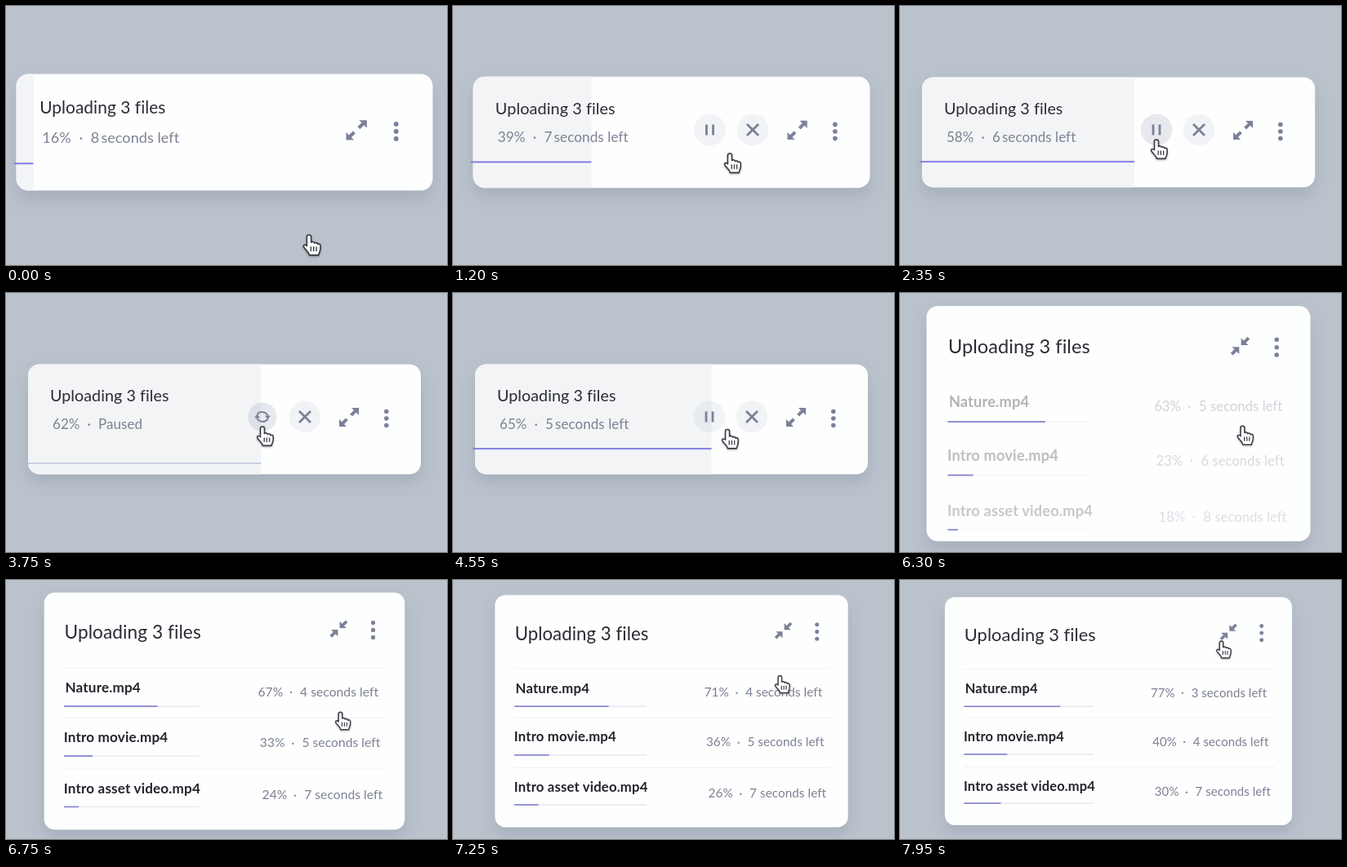
These frames come from a looping animation (540 px wide and 318 px high, 8000 ms). An HTML page:

```html
<!DOCTYPE html>
<html lang="en">
<head>
<meta charset="utf-8">
<title>Upload card</title>
<style>
html, body { margin: 0; width: 100%; height: 100%; overflow: hidden; background: #bac2cc; }
svg { display: block; width: 100%; height: 100%; }
text { font-family: Lato, "Open Sans", sans-serif; fill: #7e8094; font-size: 17px; letter-spacing: .06px; white-space: pre; }
#title { fill: #2c2c36; }
.name { fill: #24242e; font-size: 18.6px; font-weight: 700; letter-spacing: .2px; }
</style>
</head>
<body>
<svg viewBox="0 0 540 318">
  <defs>
    <filter id="shade" x="-15%" y="-15%" width="130%" height="150%">
      <feDropShadow dx="0" dy="10" stdDeviation="9" flood-color="#5f6b80" flood-opacity=".22"/>
    </filter>
    <filter id="handShade" x="-40%" y="-40%" width="180%" height="180%">
      <feDropShadow dx="0" dy="1.2" stdDeviation="1.2" flood-color="#30323e" flood-opacity=".35"/>
    </filter>
    <clipPath id="clip"><rect id="clipBox" x="-240.5" width="481" rx="14"/></clipPath>
    <path id="arrow" d="M3-11.5H12V-2.5L8.8-5.7 4-1 1.2-3.8 6-8.5Z"/>
    <g id="turn">
      <path d="M-6.6-2.2A7 6.3 0 0 1 6.6-1" fill="none" stroke="#7e8098" stroke-width="2"/>
      <path d="M3-1.2H10L6.6 3Z" fill="#7e8098"/>
    </g>
  </defs>
  <rect width="540" height="318" fill="#bac2cc"/>
  <g id="cam">
    <rect id="card" x="-240.5" width="481" rx="14" fill="#fdfefe" filter="url(#shade)"/>
    <g id="compact">
      <rect id="fill" x="-240.5" y="-160" height="320" fill="#f2f4f6" clip-path="url(#clip)"/>
      <rect id="line" height="1.8"/>
      <text id="pct" x="-210.5" y="12"></text>
      <text x="-168" y="12">·</text>
      <text id="num" x="-154.5" y="12"></text>
      <text id="left" y="12"></text>
    </g>
    <g id="buttons">
      <g transform="translate(46.5 -3)">
        <circle id="disc" fill="#3c4678"/>
        <path id="pause" d="M-4-6.5V6.5M4-6.5V6.5" stroke="#7e8098" stroke-width="2.8"/>
        <g id="retry"><use href="#turn"/><use href="#turn" transform="rotate(180)"/></g>
      </g>
      <g transform="translate(98.5 -3)">
        <circle r="19.3" fill="#3c4678" fill-opacity=".06"/>
        <path d="M-7-7L7 7M7-7L-7 7" stroke="#7e8098" stroke-width="2.8"/>
      </g>
    </g>
    <g id="rows"></g>
    <text id="title" x="-213.5">Uploading 3 files</text>
    <g id="expand">
      <use class="tip" href="#arrow"/>
      <g transform="rotate(180)"><use class="tip" href="#arrow"/></g>
    </g>
    <g id="dots" fill="#7e8098"><circle r="2.8"/><circle r="2.8"/><circle r="2.8"/></g>
  </g>
  <g id="hand" filter="url(#handShade)">
    <path d="M-2.5 2.5A2.5 2.5 0 0 1 2.5 2.5V8.6C3.5 7.4 6.2 7.8 6.4 9.6C7.4 8.4 9.8 9 10 10.8C11.2 9.8 13.2 10.6 13.2 12.4V16C13.2 19 11.6 20 11.2 23.4H.4C0 20-3.6 18-6 14.2C-7.4 11.8-4.6 10.4-2.5 12.8Z"
      fill="#fff" stroke="#3a3b44" stroke-width="1.6" stroke-linejoin="round"/>
    <path d="M2.2 13.5V19M5.4 13.5V19M8.6 13.5V19" stroke="#3a3b44" stroke-width="1.3"/>
  </g>
</svg>
<script>
const LOOP = 8000, PAUSE = 2600, RESUME = 4000, OPEN = 5990;
const NS = 'http://www.w3.org/2000/svg';
const $ = id => document.getElementById(id);
const clamp = v => Math.max(0, Math.min(1, v));
const mix = (a, b, u) => a + (b - a) * u;
const ramp = (t, start, len) => clamp((t - start) / len);
const smooth = u => u * u * (3 - 2 * u);
const easeOut = u => 1 - (1 - u) ** 3;

function set(el, attrs) {
  for (const k in attrs) el.setAttribute(k, attrs[k]);
  return el;
}
function add(parent, tag, attrs, text = '') {
  const el = set(document.createElementNS(NS, tag), attrs);
  el.textContent = text;
  return parent.appendChild(el);
}

// Piecewise track through [time, value] keys; curved tracks keep slopes monotone.
function track(keys, curved = true) {
  const n = keys.length - 1;
  const slope = i => (keys[i + 1][1] - keys[i][1]) / (keys[i + 1][0] - keys[i][0]);
  const tangent = i => {
    if (i === 0 || i === n) return 0;
    const a = slope(i - 1), b = slope(i);
    return a * b <= 0 ? 0 : 2 * a * b / (a + b);
  };
  return t => {
    if (t >= keys[n][0]) return keys[n][1];
    let i = 0;
    while (t >= keys[i + 1][0]) i++;
    const [t0, a] = keys[i], [t1, b] = keys[i + 1], d = t1 - t0, u = (t - t0) / d;
    if (!curved) return mix(a, b, u);
    return mix(a, b, smooth(u)) + d * u * (1 - u) * ((1 - u) * tangent(i) - u * tangent(i + 1));
  };
}

const width = track([[0, 510], [450, 498], [900, 489], [1200, 486], [1750, 483], [2550, 481],
  [5950, 481], [6300, 470], [6500, 456], [6750, 441.5], [7200, 433], [7700, 427], [8000, 425]]);
const handX = track([[0, 371], [300, 370], [900, 348], [1200, 339], [1600, 320], [1900, 314],
  [4300, 314], [4800, 372], [5250, 422], [6000, 422], [6300, 419.5], [6750, 409.5], [7000, 406], [7650, 393.5]]);
const handY = track([[0, 281], [300, 278], [900, 231], [1200, 181], [1600, 166], [1900, 164],
  [4300, 164], [4800, 171], [5250, 164], [6300, 163.3], [6900, 161.5], [7600, 75]]);
const share = track([[0, .041], [1200, .298], [PAUSE, .593], [RESUME + 100, .593], [5450, .62], [6100, .635]], false);
const percent = track([[0, 16.2], [1200, 39.3], [PAUSE, 62.4], [RESUME + 100, 62.4], [5450, 71.3], [6100, 75.5]], false);
const seconds = t => t < 900 ? 8 : t < 1900 ? 7 : t < PAUSE ? 6 : t < 4800 ? 5 : 4;

// at: left x, name baseline, bar y, status x, status baseline
const files = [
  { name: 'Nature.mp4', at: [-212.5, -25, -6.5, 44.7, -19.5],
    pct: [63.3, 67.3, 77.3], bar: [.678, .693, .742], secs: [5, 4, 3] },
  { name: 'Intro movie.mp4', at: [-214.5, 41.5, 60, 47.2, 48.2],
    pct: [23.3, 33.3, 40.3], bar: [.178, .212, .333], secs: [6, 5, 4] },
  { name: 'Intro asset video.mp4', at: [-214.5, 110.5, 128, 50.2, 118.2],
    pct: [18.3, 24.3, 30.3], bar: [.07, .108, .283], secs: [8, 7, 7] }
].map((f, i) => {
  const [x, nameY, barY, infoX, infoY] = f.at;
  const timed = v => track([[6000, mix(v[0], v[1], -.6)], [6300, v[0]], [6750, v[1]], [7950, v[2]]], false);
  const row = add($('rows'), 'g', {});
  const body = add(row, 'g', {});
  add(body, 'rect', { x: -214, y: [-58.5, 8.5, 77][i], width: 430, height: 1, fill: '#eeeff3' });
  add(body, 'text', { x, y: nameY, class: 'name' }, f.name);
  add(body, 'rect', { x: -214, y: barY - .9, width: 180, height: 1.8, fill: '#e9eaf3' });
  const pct = add(body, 'text', { x: infoX, y: infoY });
  add(body, 'text', { x: infoX + 42, y: infoY - .8 }, '·');
  const secs = add(body, 'text', { x: infoX + 56.2, y: infoY });
  const bar = add(row, 'rect', { x: -214, y: barY - .9, height: 1.8, fill: '#8680d0' });
  const pctAt = timed(f.pct), barAt = timed(f.bar);
  return (t, e) => {
    set(row, { transform: `translate(0 ${(1 - e) * (36 + 5 * i)})`, opacity: ramp(t, 6080, 180) });
    set(body, { opacity: ramp(t, 6130 + 25 * i, 500) });
    pct.textContent = Math.floor(pctAt(t)) + '%';
    secs.textContent = f.secs[t < 6550 ? 0 : t < 7350 ? 1 : 2] + ' seconds left';
    set(bar, { width: 180 * Math.max(0, barAt(t)) });
  };
});

function draw(t) {
  const s = width(t) / 481;
  const e = easeOut(ramp(t, OPEN, 610));
  const half = 67.5 + 91 * e;
  const paused = t >= PAUSE && t < RESUME;
  const rest = smooth(ramp(t, PAUSE, 320)) - smooth(ramp(t, RESUME, 240));
  const hide = 1 - ramp(t, OPEN, 170);

  set($('cam'), { transform: `translate(267.5 ${155 + 6 * e}) scale(${s})` });
  for (const id of ['card', 'clipBox']) set($(id), { y: -half, height: 2 * half });

  const end = 481 * share(t), lip = 2.5 * (1 - rest);
  set($('compact'), { opacity: hide });
  set($('fill'), { width: end });
  const ink = [[122, 196], [116, 202], [230, 224]].map(c => Math.round(mix(...c, rest)));
  set($('line'), { x: -240.5 - lip, y: 35.3 + 18 * rest, width: end + lip, fill: `rgb(${ink})` });
  $('pct').textContent = Math.floor(percent(t)) + '%';
  $('num').textContent = paused ? '' : seconds(t);
  $('left').textContent = paused ? 'Paused' : 'seconds left';
  set($('left'), { x: paused ? -154.5 : -142.5 });

  set($('buttons'), { opacity: Math.min(ramp(t, 900, 230), hide) });
  const over = ramp(t, 1700, 150) - ramp(t, 4380, 150);
  set($('disc'), { r: 19.3 - 1.7 * rest, 'fill-opacity': .06 + .05 * over });
  set($('pause'), { opacity: paused ? 0 : 1 });
  set($('retry'), { opacity: paused ? 1 : 0 });

  files.forEach(show => show(t, e));

  set($('title'), { y: -half + mix(45.5, 61.5, e) });
  $('title').style.fontSize = mix(19.7, 24.7, e) + 'px';
  const hot = ramp(t, 5130, 120) - ramp(t, 6050, 150);
  const icon = [[126, 72], [128, 75], [152, 98]].map(c => Math.round(mix(...c, hot)));
  set($('expand'), { transform: `translate(152.5 ${-half + mix(65, 48.5, e)})`, fill: `rgb(${icon})` });
  document.querySelectorAll('.tip').forEach(el =>
    set(el, { transform: `rotate(${t < 6100 ? 0 : 180} 6.6 -6.3)` }));
  [...$('dots').children].forEach((dot, i) =>
    set(dot, { cx: 198.3, cy: -half + mix(66.5, 50, e) + (i - 1) * mix(8.5, 9.8, e) }));

  set($('hand'), { transform: `translate(${handX(t)} ${handY(t)}) scale(${s})` });
}

const start = performance.now();
function tick() {
  draw((performance.now() - start) % LOOP);
  requestAnimationFrame(tick);
}
tick();
</script>
</body>
</html>
```
